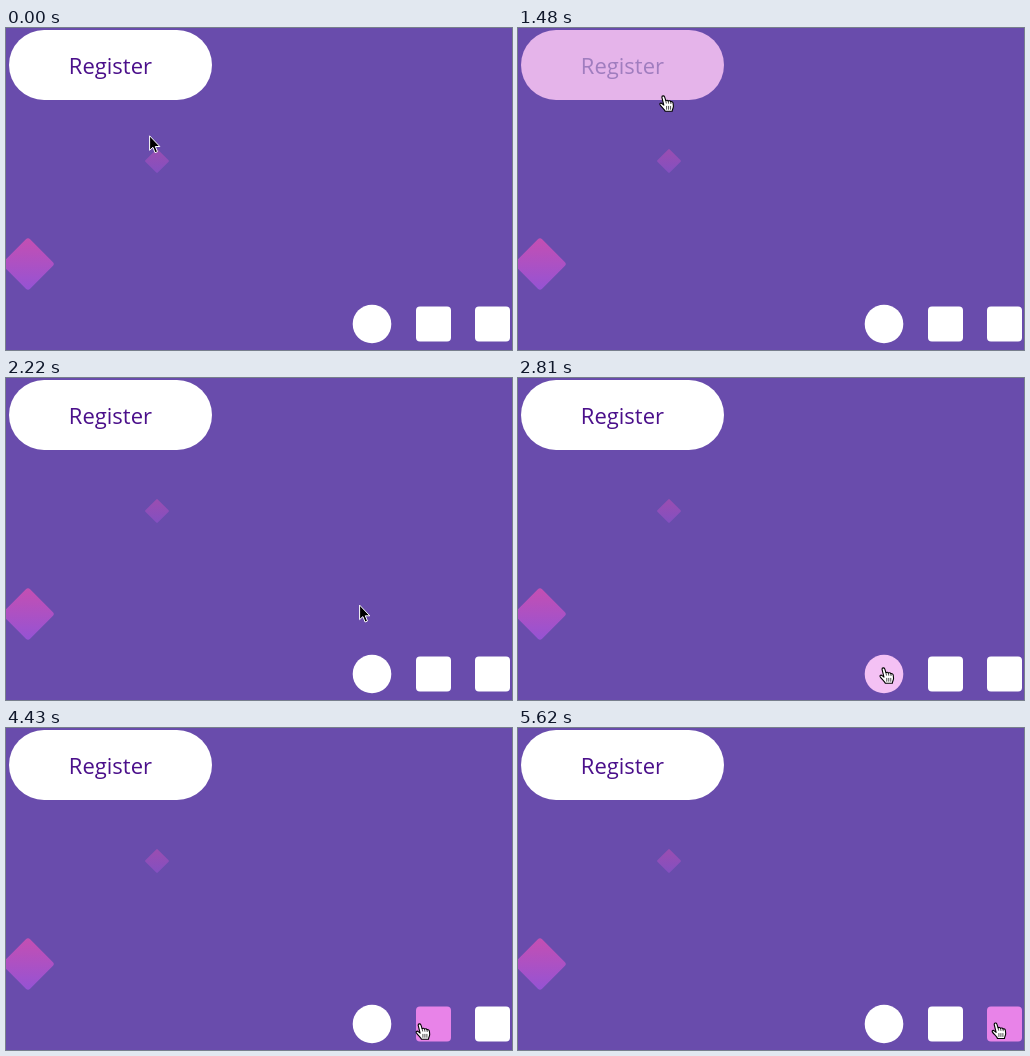
An HTML page for the animation above (5.92 s loop, 506 px wide and 322 px high).

```html
<!DOCTYPE html>
<html lang="en">
<head>
<meta charset="utf-8">
<title>Hover states</title>
<style>
  html, body { margin: 0; width: 100%; height: 100%; overflow: hidden; background: #694cac; }
  svg { display: block; width: 100%; height: 100%; }
  text { font: 22px "Open Sans", sans-serif; text-anchor: middle; }
</style>
</head>
<body>
<svg viewBox="0 0 506 322">
  <defs>
    <linearGradient id="big" x1="0" y1="0" x2="1" y2="1">
      <stop offset="0.05" stop-color="#c34fb3"/>
      <stop offset="0.95" stop-color="#9653d3"/>
    </linearGradient>
    <linearGradient id="small" x1="0" y1="0" x2="1" y2="1">
      <stop offset="0" stop-color="#9b4db0"/>
      <stop offset="1" stop-color="#8350c1"/>
    </linearGradient>
  </defs>

  <rect x="-19" y="-19" width="38" height="38" rx="3" fill="url(#big)" transform="translate(22 236) rotate(45)"/>
  <rect x="-8.7" y="-8.7" width="17.4" height="17.4" rx="1" fill="url(#small)" transform="translate(151 133) rotate(45)"/>

  <rect id="button" x="3" y="2" width="203" height="70" rx="35"/>
  <text id="label" x="104.4" y="46">Register</text>

  <circle id="disc" cx="366" cy="296" r="19.3"/>
  <rect id="tileA" x="410" y="278.5" width="35" height="35" rx="4"/>
  <rect id="tileB" x="469" y="278.5" width="35" height="35" rx="4"/>

  <g id="cursor" stroke-linejoin="round">
    <path id="arrow" fill="#000" stroke="#fff" stroke-width="1"
      d="M0.3 0.3V14.8L3.6 11.8L5.8 17.2L8.2 16.2L6 11H10.5Z"/>
    <g id="hand" stroke="#000" stroke-linecap="round" transform="translate(-1 -0.7)">
      <path fill="#fff" stroke-width="1.1"
        d="M-1.1 1C-1.2 -0.7 1 -1 1.6 0.6L2.8 4.4C3.7 3.6 4.9 3.8 5.2 4.8C6.2 4.1 7.4 4.5 7.7 5.5C8.9 5 10 5.7 10.1 7L10.4 10C10.4 11.8 9.3 13 9.2 15H2.2C1.6 12.8 -1.4 11 -3 8.4C-3.6 7 -2 6.2 -0.7 7.6L0.8 8.8Z"/>
      <path fill="none" stroke-width="0.7" d="M2.8 4.4L3.3 6.8M5.2 4.8L5.6 7M7.7 5.5L7.9 7.3M3.6 10V13M5.6 10V13M7.6 10V13"/>
    </g>
  </g>
</svg>
<script>
  const STEP = 148, STEPS = 40, FADE_STEPS = 2;
  const $ = id => document.getElementById(id);

  // Pointer stops: step, x, y. It glides between them and rests on equal ones.
  const stops = [
    [1, 143.3, 107.5], [3, 140.5, 71], [5, 140.5, 66.3], [9, 140.5, 66.3],
    [10, 146, 69], [11, 172.3, 92.8], [15, 353.3, 226.8], [17, 353.3, 258],
    [18, 361, 284], [20, 371.3, 298], [25, 371.3, 298], [28, 411, 297],
    [30, 414.3, 297], [32, 414.3, 297], [36, 471, 296], [38, 478.3, 296.2]
  ];

  const white = [255, 255, 255], pink = [232, 131, 232];
  const colors = {
    button: [white, [229, 180, 234]],
    label: [[75, 16, 139], [160, 125, 191]],
    disc: [white, pink],
    tileA: [white, pink],
    tileB: [white, pink]
  };
  const targets = ["button", "disc", "tileA", "tileB"];

  const clamp = v => Math.min(1, Math.max(0, v));
  const lerp = (a, b, k) => a + (b - a) * k;

  function pointer(step) {
    const next = stops.findIndex(s => s[0] > step);
    if (next === 0) return stops[0].slice(1);
    if (next < 0) return stops[stops.length - 1].slice(1);
    const [s0, x0, y0] = stops[next - 1], [s1, x1, y1] = stops[next];
    const k = (step - s0) / (s1 - s0);
    return [lerp(x0, x1, k), lerp(y0, y1, k)];
  }

  function isOver(id, step) {
    const [x, y] = pointer(step), box = $(id).getBBox();
    return x >= box.x && x <= box.x + box.width && y >= box.y && y <= box.y + box.height;
  }

  // Fades in while hovered, out afterwards.
  function hoverLevel(id, step) {
    let level = 0;
    for (let s = 0; s < step; s++)
      level = clamp(level + (isOver(id, s) ? 1 : -1) / FADE_STEPS);
    return level;
  }

  function paint(id, level) {
    const [from, to] = colors[id];
    $(id).style.fill = `rgb(${from.map((v, i) => Math.round(lerp(v, to[i], level)))})`;
  }

  function draw(step) {
    const over = targets.some(id => isOver(id, step));
    $("cursor").setAttribute("transform", `translate(${pointer(step)})`);
    $("arrow").style.display = over ? "none" : "";
    $("hand").style.display = over ? "" : "none";
    for (const id of targets) paint(id, hoverLevel(id, step));
    paint("label", hoverLevel("button", step));
  }

  const start = performance.now();
  let shown = -1;
  function tick(now) {
    const time = Math.max(0, now - start) % (STEP * STEPS);
    const step = Math.min(STEPS - 1, Math.floor((time + 10) / STEP));
    if (step !== shown) draw(shown = step);
    requestAnimationFrame(tick);
  }
  tick(start);
</script>
</body>
</html>
```
